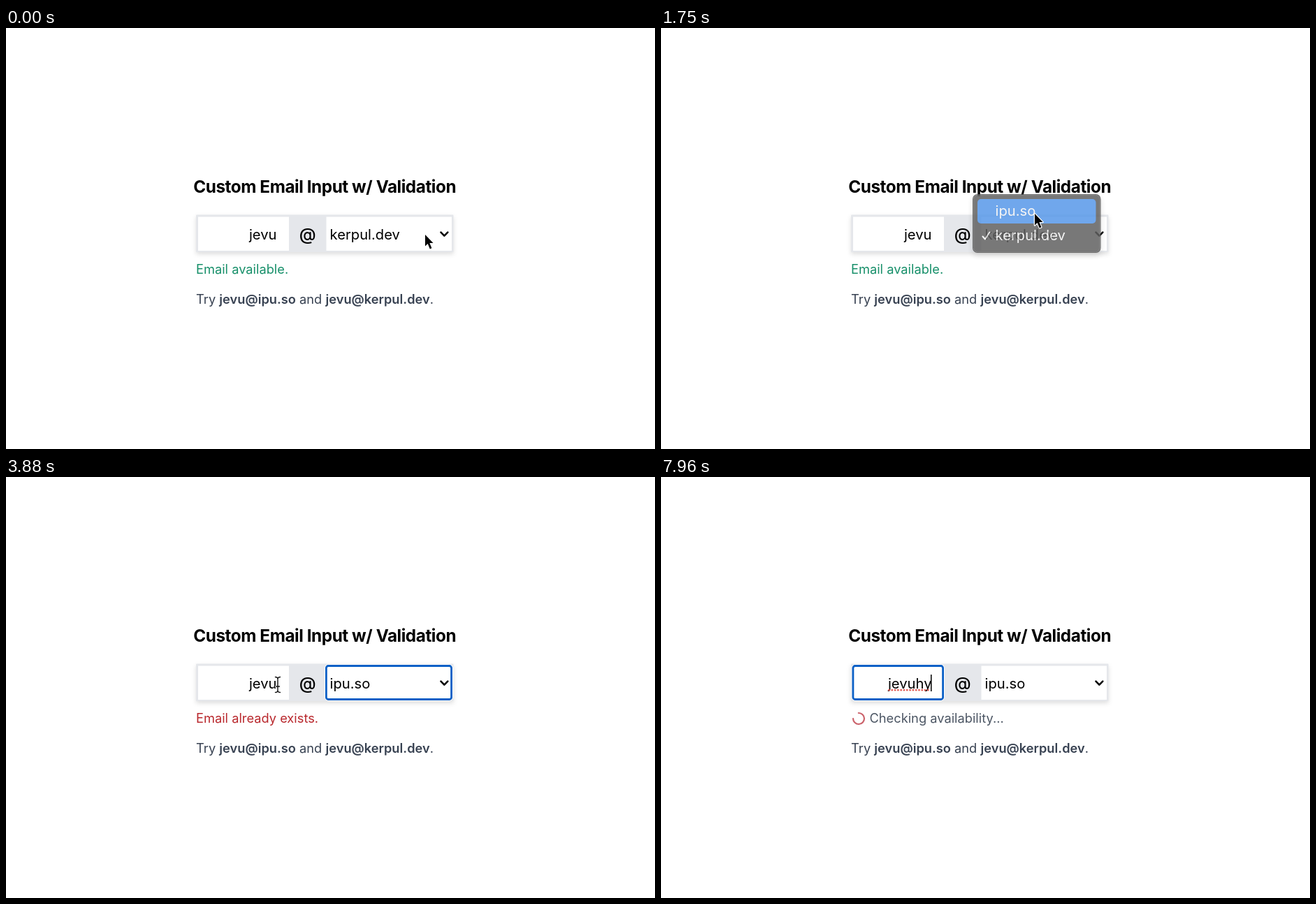
Recreate the animation shown at these times as an HTML page. Size 929x603 px, loop 8 s.

```html
<!DOCTYPE html>
<html lang="en">
<head>
<meta charset="utf-8">
<title>Email input</title>
<style>
  html, body { margin: 0; height: 100%; overflow: hidden; background: #fff; }
  svg { display: block; font: 20.2px Inter, sans-serif; font-optical-sizing: none; }
  .field { filter: drop-shadow(0 3px 3px rgba(0,0,0,.13)); }
  .menu-box { filter: drop-shadow(0 4px 4px rgba(0,0,0,.15)); }
  .small { font-size: 18.25px; }
  .bold { font-weight: 600; }
  .line { fill: none; stroke-linecap: round; stroke-linejoin: round; }
</style>
</head>
<body>
<svg width="929" height="603" viewBox="0 0 929 603">
  <defs>
    <path id="beamShape" d="M-3.5-10.5Q0-10.5 0-7.5Q0-10.5 3.5-10.5M0-7.5V8.5M-3.5 11.5Q0 11.5 0 8.5Q0 11.5 3.5 11.5M-2.5 3H2.5"/>
  </defs>
  <text x="456.2" y="236" text-anchor="middle" font-size="24.3" font-weight="700" letter-spacing="-.018em">Custom Email Input w/ Validation</text>

  <rect class="field" x="272" y="267.5" width="368.5" height="53.5" rx="1" fill="#e5e7eb"/>
  <path d="M275 270.5h130v48.5h-130zM458.5 270.5h179.5v48.5h-179.5z" fill="#fff"/>
  <g id="ring" fill="none">
    <rect id="halo" y="268.5" height="52" rx="5" stroke="#fff"/>
    <rect id="edge" y="270.5" height="48" rx="3" stroke="#0a60c6" stroke-width="2.8" fill="#fff"/>
  </g>
  <text id="user" x="387.5" y="303" text-anchor="end"></text>
  <line id="squiggle" class="line" x2="386" y1="305.2" y2="305.2" stroke="#e25a52" stroke-width="2.8" stroke-dasharray="0 4.3"/>
  <rect id="caret" x="386" y="283" width="1.5" height="24"/>
  <text x="431.7" y="303.5" text-anchor="middle" font-size="24.3" font-weight="500">@</text>
  <text id="domain" x="463.5" y="303"></text>
  <path class="line" d="M622.5 292.7l4.9 4.9 4.9-4.9" stroke="#000" stroke-width="2.6"/>

  <path id="spinner" class="line" d="M5.66-5.66A8 8 0 1 1-5.66-5.66" stroke="#cb626b" stroke-width="2.2"/>
  <text id="status" class="small" y="352"></text>
  <text class="small" x="272" y="395" fill="#374151">Try <tspan class="bold">jevu@ipu.so</tspan> and <tspan class="bold">jevu@kerpul.dev</tspan>.</text>

  <g id="menu" fill="#f4f4f4">
    <rect class="menu-box" x="446" y="238" width="183.5" height="84" rx="7" fill="#484848"/>
    <rect x="447.2" y="239.2" width="181" height="81.6" rx="6" fill="#606060" stroke="#7b7b7b"/>
    <rect id="highlight" x="453" width="169.5" height="35" rx="5" fill="#5798e9"/>
    <text x="478.5" y="269">ipu.so</text>
    <text x="478.5" y="304">kerpul.dev</text>
    <path class="line" d="M460.5 298.5l3.4 4 6.6-10" stroke="#f4f4f4" stroke-width="2"/>
  </g>

  <path id="arrow" d="M0 0V16.5l3.7-3.4 3.1 7.3 2.6-1.1-3-7.2h5.1z" stroke="#fff" stroke-width="2.4" paint-order="stroke" stroke-linejoin="round"/>
  <g id="beam" class="line">
    <use href="#beamShape" stroke="#fff" stroke-width="3"/>
    <use href="#beamShape" stroke="#111" stroke-width="1.4"/>
  </g>
</svg>
<script>
const LOOP = 8000;
const MENU_OPEN = 750, MENU_FADE = 1700, CHOSEN = 1830, FOCUS_USER = 3960;
// time, x, y of the pointer
const track = [
  [40, 600, 296], [330, 552, 290], [1000, 552, 290], [1210, 551, 281],
  [1500, 535, 266], [3400, 535, 266], [3850, 389, 297], [3920, 389, 297], [4000, 386, 297]
];
const $ = id => document.getElementById(id);
const set = (id, attrs) => {
  for (const name in attrs) $(id).setAttribute(name, attrs[name]);
};
const show = (id, on) => { $(id).style.display = on ? '' : 'none'; };
const write = (id, text) => { if ($(id).textContent !== text) $(id).textContent = text; };
const between = (t, from, to) => t >= from && t < to;

function pointerAt(t) {
  const next = track.findIndex(key => key[0] > t);
  if (next === 0) return track[0].slice(1);
  if (next < 0) return track[track.length - 1].slice(1);
  const [t0, x0, y0] = track[next - 1], [t1, x1, y1] = track[next];
  const p = (t - t0) / (t1 - t0), ease = p * p * (3 - 2 * p);
  return [x0 + (x1 - x0) * ease, y0 + (y1 - y0) * ease];
}

function drawStatus(t) {
  const spinStart = t < 5000 ? 1795 : 7090;
  const checking = between(t, CHOSEN, 3000) || t >= 7130;
  const [text, color] = checking ? ['Checking availability...', '#4b5563']
    : t < CHOSEN ? ['Email available.', '#168f69']
    : ['Email already exists.', '#b9282d'];
  write('status', text);
  set('status', { x: checking ? 298.5 : 272, fill: color });
  show('spinner', checking);
  set('spinner', { transform: `translate(283 346) rotate(${(t - spinStart) * .36})` });
}

function drawFields(t) {
  const onUser = t >= FOCUS_USER;
  const x = onUser ? 273.5 : 457, width = onUser ? 131.5 : 182;
  show('ring', t >= CHOSEN);
  set('halo', { x: x - .5, width: width + 1 });
  set('edge', { x: x + 1.4, width: width - 2.8 });

  write('user', 'jevu' + (t >= 6000 ? 'h' : '') + (t >= 6540 ? 'y' : ''));
  write('domain', t < CHOSEN ? 'kerpul.dev' : 'ipu.so');
  show('squiggle', t >= 6080);
  set('squiggle', { x1: 389 - $('user').getComputedTextLength() });
  show('caret', between(t, FOCUS_USER, 4380) || between(t, 4540, 5130)
    || between(t, 6000, 7130) || t >= 7540);
}

function drawMenu(t, pointerY) {
  const fade = Math.max(0, (t - MENU_FADE) / (CHOSEN - MENU_FADE));
  show('menu', between(t, MENU_OPEN, CHOSEN));
  set('menu', { opacity: Math.max(0, 1 - fade * fade) });
  set('highlight', { y: pointerY < 280 ? 245 : 280 });
}

function drawPointer(t, x, y) {
  const overInput = x < 405;
  show('arrow', !overInput);
  show('beam', overInput && t < 6000);
  for (const id of ['arrow', 'beam']) set(id, { transform: `translate(${x} ${y})` });
}

function frame(now) {
  const t = now % LOOP;
  const [x, y] = pointerAt(t);
  drawStatus(t);
  drawFields(t);
  drawMenu(t, y);
  drawPointer(t, x, y);
  requestAnimationFrame(frame);
}
requestAnimationFrame(frame);
</script>
</body>
</html>
```
